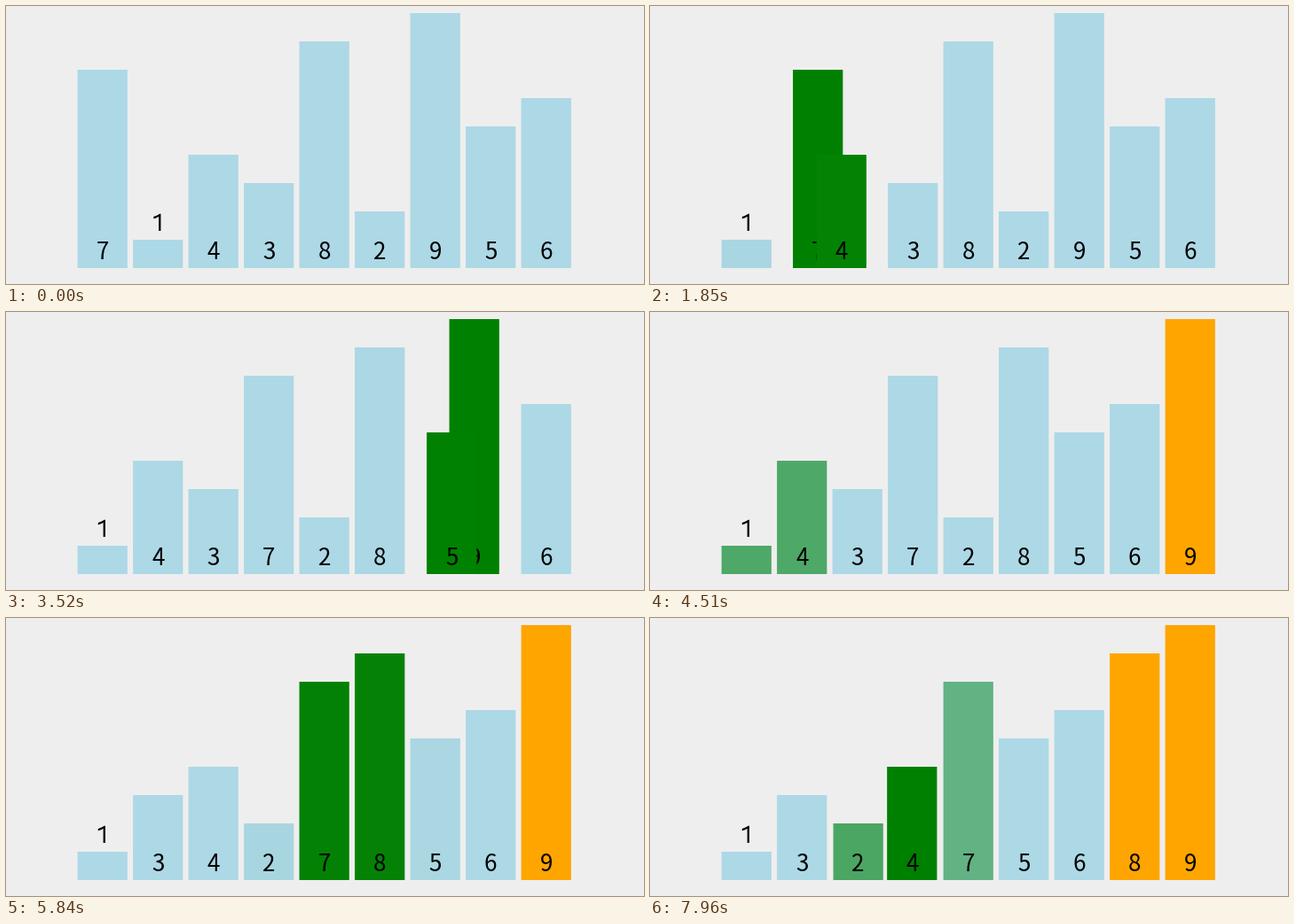
Recreate the animation shown at these times as a matplotlib script. Size 719 px wide and 314 px high, loop 8 s.

```python
import numpy as np
import matplotlib.pyplot as plt
from matplotlib.animation import FuncAnimation
from matplotlib.colors import to_rgb
from matplotlib.patches import Polygon, Rectangle

W, H, DPI = 719, 314, 64
LOOP, STEP = 8000, 20

LEFT, PITCH, BAR_W = 80.6, 62.5, 56.25
BASE, UNIT, LABEL_GAP = 296, 32, 10
BLUE, GREEN, ORANGE = (to_rgb(c) for c in ("lightblue", "green", "orange"))

START = 1133        # first comparison, ms
STATE = 203         # time from one state to the next
GLIDE = 250         # transition length; the next state cuts it short
TICK0, TICK = 1180, 111   # the picture is refreshed on this beat

VALUES = [7, 1, 4, 3, 8, 2, 9, 5, 6]
ONE = np.array([(3.2, -19.3), (3.2, 0), (0.9, 0), (0.9, -16.2), (-1.5, -14.8),
                (-4.9, -13.7), (-4.9, -16), (-1.2, -17.4), (2.2, -19.3)])


def look(order, active=(), done=()):
    """Rows of x, r, g, b for every bar, in drawing order."""
    rows = []
    for v in VALUES:
        color = ORANGE if v in done else GREEN if v in active else BLUE
        rows.append((LEFT + PITCH * order.index(v), *color))
    return np.array(rows)


def bubble_states():
    order, done, states = VALUES[:], [], []
    for last in range(len(order) - 1, 0, -1):
        for i in range(last):
            pair = order[i:i + 2]
            states.append(look(order, pair, done))
            if pair[0] > pair[1]:
                order[i:i + 2] = pair[::-1]
                states.append(look(order, pair, done))
        done.append(order[last])
        states += [look(order, (), done)] * 2
    return states


def ease(t):
    t = min(max(t, 0), 1)
    return 4 * t ** 3 if t < 0.5 else 1 - 4 * (1 - t) ** 3


STATES = bubble_states()
FIRST = look(VALUES)


def pose(t):
    rows = FIRST.copy()
    for k, goal in enumerate(STATES):
        since = t - START - k * STATE
        if since <= 0:
            break
        rows += (goal - rows) * ease(min(since, STATE) / GLIDE)
    return rows


fig = plt.figure(figsize=(W / DPI, H / DPI), dpi=DPI, facecolor="#eeeeee")
ax = fig.add_axes([0, 0, 1, 1])
ax.set_xlim(0, W)
ax.set_ylim(H, 0)
ax.axis("off")

bars, labels = [], []
for i, v in enumerate(VALUES):
    bar = Rectangle((0, BASE - UNIT * v), BAR_W, UNIT * v, lw=0, zorder=i, snap=False)
    bars.append(ax.add_patch(bar))
    if v == 1:
        label = ax.add_patch(Polygon(ONE, color="black", lw=0, zorder=i + 0.5))
    else:
        label = ax.text(0, BASE - LABEL_GAP, str(v), ha="center", va="baseline",
                        family="Noto Sans CJK JP", fontsize=26 * 72 / DPI,
                        zorder=i + 0.5)
    labels.append(label)


def draw(n):
    t = n * STEP + STEP / 2
    beat = TICK0 + TICK * ((t - TICK0) // TICK)
    for v, bar, label, (x, *rgb) in zip(VALUES, bars, labels, pose(beat)):
        bar.set_x(x)
        bar.set_facecolor(np.clip(rgb, 0, 1))
        mid = x + BAR_W / 2
        if v == 1:
            label.set_xy(ONE + (mid, BASE - UNIT - LABEL_GAP))
        else:
            label.set_x(mid)
    return bars + labels


anim = FuncAnimation(fig, draw, frames=LOOP // STEP, interval=STEP,
                     repeat=True, repeat_delay=0)
plt.show()
```
